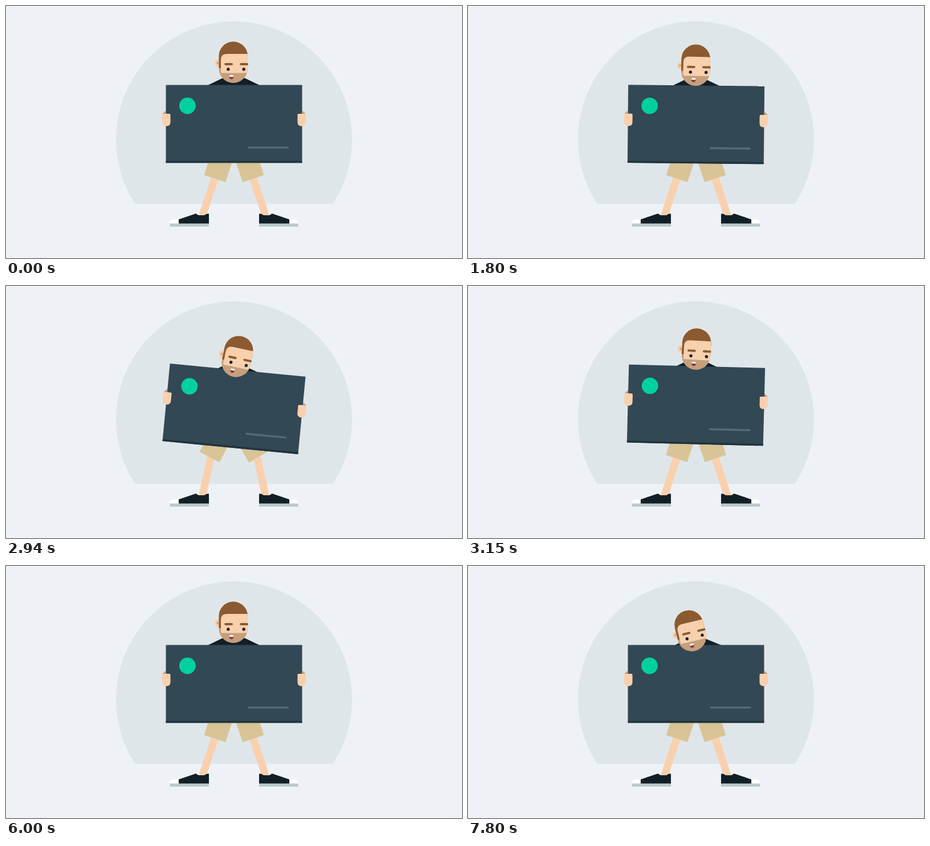
Animation, 800 px wide and 442 px high, one loop 8 s. Source, as an HTML page:

```html
<!DOCTYPE html>
<html lang="en">
<head>
<meta charset="utf-8">
<title>Card holder</title>
<style>
  html, body { margin: 0; width: 100%; height: 100%; overflow: hidden; background: #eef2f7; }
  svg { display: block; width: 100vw; height: 100vh; }
</style>
</head>
<body>
<svg viewBox="0 0 800 442">
  <defs>
    <clipPath id="ground"><rect width="800" height="347"/></clipPath>
    <clipPath id="skull"><rect x="373.5" y="62.5" width="50.5" height="72.5" rx="25.25"/></clipPath>
    <g id="shoe">
      <path fill="#fff" d="M334 364.5L335 360.5L338 362L340 368L333 368ZM287.500 382Q287.500 374.500 294 374.300L304 374V382Z"/>
      <path fill="#131f27" d="M303 382V374.300L333.500 364Q336 367 339 367H348Q351 364.500 355 364Q356 364.500 356 366V382Z"/>
      <rect x="287.500" y="381.500" width="68.500" height="5.500" fill="#b8cbc7"/>
    </g>
    <g id="hand">
      <path fill="#c6997a" d="M274 189.500L280.500 183V189.500Z"/>
      <path fill="#f9d0ad" d="M274 189H286.500Q288.500 189 288.500 191V204Q288.500 210.700 281.300 210.700Q274 210.700 274 204Z"/>
    </g>
  </defs>

  <rect width="800" height="442" fill="#eef2f7"/>
  <circle cx="400" cy="234" r="207" fill="#dfe6ea" clip-path="url(#ground)"/>

  <g id="legs">
    <g class="leg">
      <line class="shin" stroke="#f9d0ad" stroke-width="13.1"/>
      <rect class="thigh" x="-19.750" y="-52" width="39.500" height="62" fill="#d9c497"/>
      <use href="#shoe"/>
    </g>
    <g class="leg" transform="translate(800) scale(-1 1)">
      <line class="shin" stroke="#f9d0ad" stroke-width="13.1"/>
      <rect class="thigh" x="-19.750" y="-52" width="39.500" height="62" fill="#d9c497"/>
      <use href="#shoe"/>
    </g>
  </g>

  <path id="body" fill="#131f27" d="M318 156.300L381 126H418L481 156.300V200H318Z"/>

  <g id="card">
    <rect x="280.500" y="138.500" width="239" height="136.700" fill="#324854"/>
    <rect x="280.500" y="271.700" width="239" height="3.500" fill="#20343d"/>
    <circle cx="318.400" cy="175" r="14.400" fill="#00d19c"/>
    <rect x="424.300" y="246.500" width="72" height="3.600" rx="1.600" fill="#566974"/>
    <use href="#hand"/>
    <use href="#hand" transform="translate(800) scale(-1 1)"/>
  </g>

  <g id="head">
    <ellipse cx="371.500" cy="100" rx="5.700" ry="6.300" fill="#f9d0ad"/>
    <circle cx="371.200" cy="100" r="2.200" fill="#d9a987"/>
    <g clip-path="url(#skull)">
      <rect x="373" y="62" width="52" height="74" fill="#c69f7b"/>
      <rect x="373" y="62" width="52" height="47" fill="#8c5a30"/>
      <path fill="#f9d0ad" d="M377 94Q377 84 387 84H425V117.500H379Q377 117.500 377 115.500Z"/>
    </g>
    <g id="brows" fill="#8c5a30">
      <rect x="383.300" y="100" width="14.700" height="3.900" rx="1.900"/>
      <rect x="410.300" y="100" width="14.700" height="3.900" rx="1.900"/>
    </g>
    <g id="eyes" fill="#131f27">
      <circle cx="389.800" r="2.750"/>
      <circle cx="417.200" r="2.750"/>
    </g>
    <path fill="#8e343d" d="M391.500 122Q395.500 120 399.500 122Q399.700 128.500 395.500 128.500Q391.300 128.500 391.500 122Z"/>
    <path fill="#fff" d="M391.500 122Q395.500 120 399.500 122L399.200 124.300H391.800Z"/>
  </g>
</svg>
<script>
const LOOP = 8000, TILT = 5.8, REST_LEG = 18.4;
const byId = id => document.getElementById(id);
const [body, card, head, brows, eyes] = ['body', 'card', 'head', 'brows', 'eyes'].map(byId);
const legs = [...document.querySelectorAll('.leg')].map(leg => ({
  shin: leg.querySelector('.shin'),
  thigh: leg.querySelector('.thigh')
}));
const clamp = x => Math.min(1, Math.max(0, x));

function ease(t, start, end) {
  const x = clamp((t - start) / (end - start));
  return x < 0.5 ? 4 * x ** 3 : 1 - 4 * (1 - x) ** 3;
}

// Rises to 1, stays, then falls back to 0.
const hold = (t, a, b, c, d) => ease(t, a, b) - ease(t, c, d);

function place(el, dx, dy, angle, px, py) {
  el.setAttribute('transform', `translate(${dx} ${dy}) rotate(${angle} ${px} ${py})`);
}

function poseLeg({ shin, thigh }, shinAngle, thighAngle) {
  const a = shinAngle * Math.PI / 180;
  const along = len => [344.5 + len * Math.sin(a), 368 - len * Math.cos(a)];
  const [kx, ky] = along(78.7), [fx, fy] = along(-4);
  const ends = { x1: fx, y1: fy, x2: kx, y2: ky };
  for (const key in ends) shin.setAttribute(key, ends[key]);
  thigh.setAttribute('transform', `translate(${kx} ${ky}) rotate(${thighAngle})`);
}

function eyeOpening(t) {
  for (const [start, length] of [[400, 260], [4000, 260], [4850, 280], [6590, 265]]) {
    const x = (t - start) / length;
    if (x > 0 && x < 1) return Math.max(0.08, Math.abs(Math.cos(Math.PI * x)));
  }
  return 1;
}

function draw(t) {
  const squat = hold(t, 1660, 2148, 2815, 3370);
  const duck = hold(t, 1630, 2085, 2920, 3380);
  const sway = Math.cos(2 * Math.PI * clamp((t - 2148) / 667));
  const tilt = TILT * squat * sway;
  const peek = ease(t, 7250, 7800);

  place(card, 0, 9 * squat, tilt, 400, 207);
  place(body, 0, 14 * duck + 2.6 * peek, -3.5 * peek, 400, 150);
  place(head, 0.35 * tilt - 2.5 * peek, 23.7 * duck + 15 * peek,
    2.15 * tilt - 13.5 * peek, 395.5, 124.5);

  const bend = clamp((squat - 0.2) / 0.8);
  legs.forEach((leg, i) => {
    const lean = (i ? 1 : -1) * 1.5 * sway;
    poseLeg(leg, REST_LEG - 6.2 * bend, REST_LEG + (11.2 + lean) * bend);
  });

  const raise = hold(t, 5980, 6260, 6320, 6600);
  const glance = hold(t, 5980, 6260, 7250, 7800);
  brows.setAttribute('transform', `translate(0 ${-4 * raise})`);
  eyes.setAttribute('transform', `translate(${-2 * glance} 111) scale(1 ${eyeOpening(t)})`);
}

const began = performance.now();
function tick() {
  draw((performance.now() - began) % LOOP);
  requestAnimationFrame(tick);
}
tick();
</script>
</body>
</html>
```
